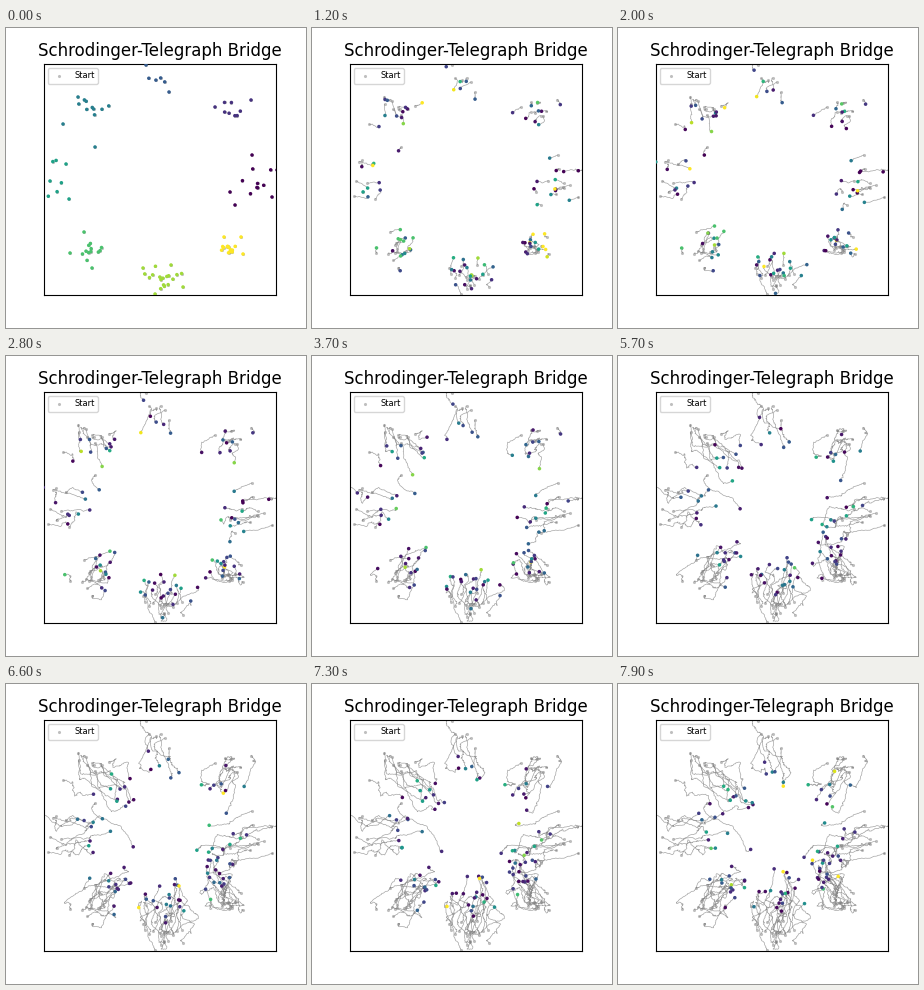
A matplotlib script for the animation above (8000 ms loop, 300 by 300 pixels).

```python
import numpy as np
import matplotlib.pyplot as plt
from matplotlib.animation import FuncAnimation
from matplotlib.collections import LineCollection

FRAMES, STEP_MS = 80, 100
CENTRE = np.array([153.75, 151.5])
RADIUS = 98
rng = np.random.default_rng(12)

# Eight clusters, anticlockwise from the right:
# outlying starts, mean drift, number of random starts, their spread
CLUSTERS = [
    ([(246, 127), (266, 169), (271, 142), (229, 177), (224, 164)],
     (-32, 8), 8, 8),
    ([(209, 79), (245, 72)], (-17, 27), 7, 5),
    ([(140, 37), (163, 64)], (5, 39), 4, 5),
    ([(72, 69), (57, 96), (89, 119)], (38, 34), 9, 7),
    ([(60, 136), (63, 171), (44, 153), (34, 143)], (47, -5), 5, 8),
    ([(78, 204), (64, 225), (86, 240)], (30, -23), 11, 6),
    ([(137, 240), (165, 237), (177, 259)], (6, -41), 17, 8),
    ([(218, 209), (235, 209), (237, 226)], (-17, -30), 12, 4),
]


def build_swarm():
    starts, drifts, hues = [], [], []
    for i, (outliers, drift, extra, spread) in enumerate(CLUSTERS):
        a = i * np.pi / 4
        hub = CENTRE + RADIUS * np.array([np.cos(a), -np.sin(a)])
        pts = np.vstack([outliers, rng.normal(hub, spread, (extra, 2))])
        pts[:, 1] = np.minimum(pts[:, 1], 266)
        n = len(pts)
        starts.append(pts)
        drifts.append(np.array(drift) * rng.uniform(0.7, 1.3, (n, 1))
                      + rng.normal(0, 5, (n, 2)))
        hues.append(np.full(n, i / 7))
    return np.vstack(starts), np.vstack(drifts), np.concatenate(hues)


def telegraph_paths(starts, drifts, hues, flip_rate=0.09, speed=0.65):
    """Random headings held between flips, pinned at both ends."""
    n = len(starts)
    heading = rng.uniform(0, 2 * np.pi, n)
    wander = np.zeros((FRAMES, n, 2))
    shade = np.zeros((FRAMES, n))
    shade[0] = hues
    for k in range(1, FRAMES):
        flip = rng.random(n) < flip_rate
        heading = np.where(flip, rng.uniform(0, 2 * np.pi, n), heading)
        fresh = np.minimum(rng.exponential(0.28, n), 1)
        shade[k] = np.where(flip, fresh, shade[k - 1])
        move = speed * np.column_stack([np.cos(heading), np.sin(heading)])
        wander[k] = wander[k - 1] + move + rng.normal(0, 0.4, (n, 2))
    t = np.linspace(0, 1, FRAMES)[:, None, None]
    return starts + t * drifts + wander - t * wander[-1], shade


starts, drifts, hues = build_swarm()
paths, shade = telegraph_paths(starts, drifts, hues)

fig, ax = plt.subplots(figsize=(3, 3), dpi=100)
ax.set_xlim(37.5, 270)
ax.set_ylim(267, 36)
ax.set_xticks([])
ax.set_yticks([])
ax.set_title("Schrodinger-Telegraph Bridge", fontsize=12)

trails = LineCollection([], colors="gray", linewidths=0.5, alpha=0.7, zorder=1)
ax.add_collection(trails, autolim=False)
ax.scatter(*starts.T, s=5, c="gray", alpha=0.5, linewidths=0, zorder=2,
           label="Start")
dots = ax.scatter(*starts.T, s=6.5, c=hues, cmap="viridis", vmin=0, vmax=1,
                  linewidths=0, zorder=3)
ax.legend(loc="upper left", fontsize=6, scatterpoints=1)


def draw(k):
    dots.set_offsets(paths[k])
    dots.set_array(shade[k])
    trails.set_segments(list(paths[:k + 1].swapaxes(0, 1)) if k else [])
    return trails, dots


anim = FuncAnimation(fig, draw, frames=FRAMES, interval=STEP_MS, repeat=True,
                     repeat_delay=0, blit=False)
plt.show()
```
